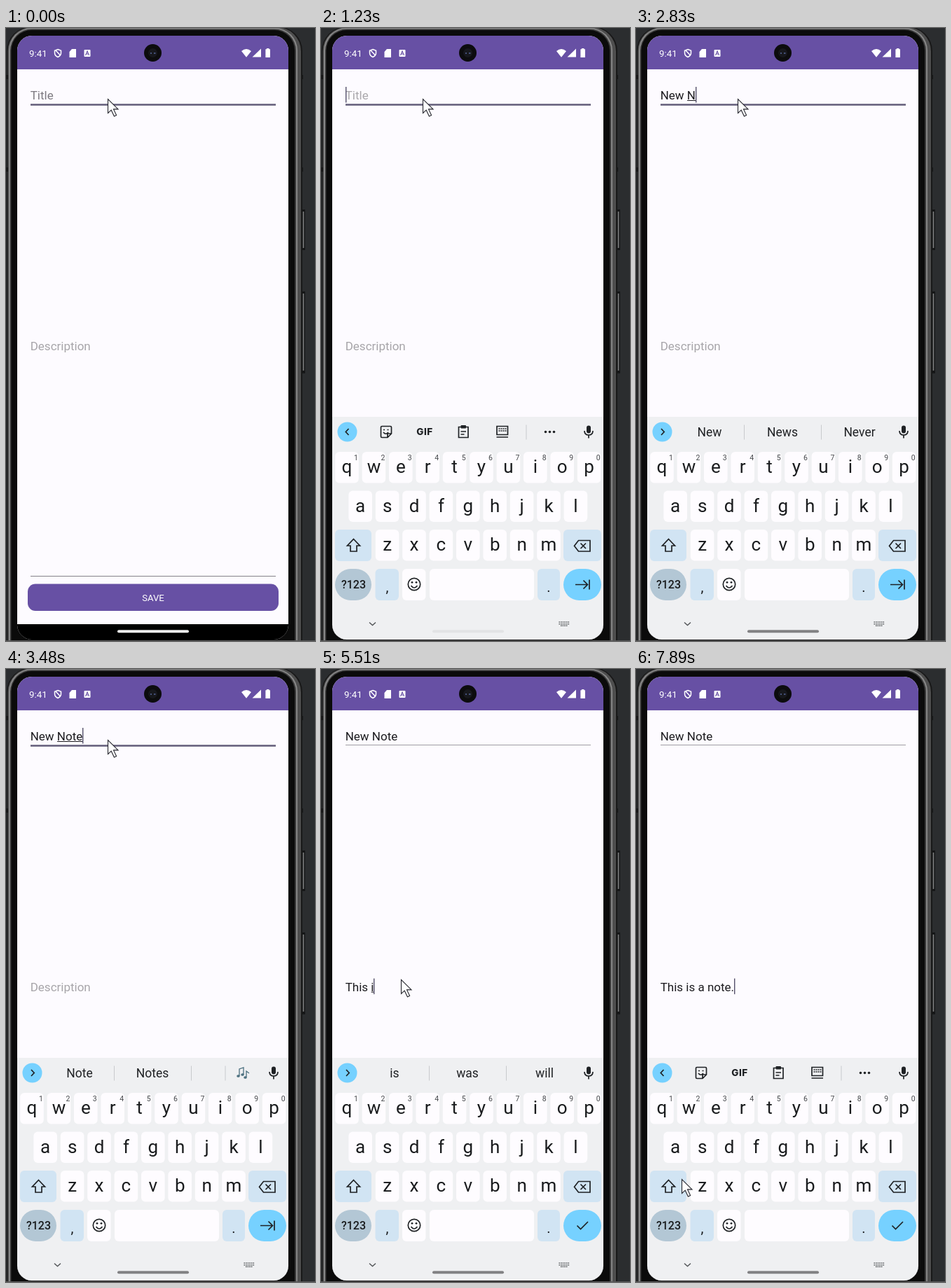
Animation, 441 px wide and 875 px high, one loop 8000 ms. Source, as an HTML page:

```html
<!DOCTYPE html>
<html lang="en">
<head>
<meta charset="utf-8">
<title>New note</title>
<style>
  html, body { margin: 0; width: 100%; height: 100%; overflow: hidden; background: #2b2d2f; }
  svg { display: block; width: 441px; height: 875px; }
  text { font-family: Roboto, sans-serif; white-space: pre; }
  .field { font-size: 17px; fill: #1c1b1f; }
  .key { font-size: 26px; fill: #1a1c1e; text-anchor: middle; }
  .hint { font-size: 10.5px; fill: #44474a; text-anchor: middle; }
  .word { font-size: 17.5px; fill: #1f2124; text-anchor: middle; }
  .line { fill: none; stroke: #1f2225; stroke-width: 1.7; }
</style>
</head>
<body>
<svg viewBox="0 0 441 875">
  <defs>
    <clipPath id="screen"><rect x="16" y="11" width="387" height="862" rx="21"/></clipPath>
  </defs>

  <rect width="441" height="875" fill="#2b2d2f"/>
  <g fill="#161718">
    <path d="M421 67h3v6h-3zM421 199h3v6h-3zM423 259h4v58h-4zM423 376h4v117h-4z"/>
    <path d="M424.500 262v52M424.500 379v110" stroke="#808182" stroke-width="1.600"/>
  </g>
  <rect x="1" y="-2" width="422" height="910" rx="35" fill="#181818"/>
  <rect x="2.500" y="-1" width="418.500" height="908" rx="34" fill="#4e4e4e"/>
  <rect x="4" y="0" width="412" height="906" rx="32" fill="#868686"/>
  <rect x="6" y="1.500" width="408" height="904" rx="31" fill="#3a3a3a"/>
  <rect x="7.500" y="3" width="404.500" height="902" rx="29" fill="#0b0b0b"/>
  <path d="M0 67h3v6H0zM0 199h3v6H0z" fill="#171717"/>
  <path d="M0 874.500H441" stroke="#555"/>

  <g clip-path="url(#screen)">
    <rect x="16" y="11" width="387" height="862" fill="#fdfbff"/>
    <rect x="16" y="11" width="387" height="48" fill="#6750a4"/>
    <rect x="31" y="793.500" width="358" height="38.500" rx="11" fill="#6750a4"/>
    <text x="210" y="818" fill="#fff" font-size="13.1" text-anchor="middle">SAVE</text>
    <path d="M35 782.500H385" stroke="#858289"/>
    <rect x="16" y="851" width="387" height="23" fill="#000"/>
    <g id="view"></g>
  </g>

  <g fill="#fff">
    <text x="33" y="41" font-size="13.3">9:41</text>
    <path d="M74 30.500l4.500 1.700v3.600q0 3.700-4.500 5.700-4.500-2-4.500-5.700v-3.600zM71 32l6.500 7" fill="none" stroke="#fff" stroke-width="1.500"/>
    <path d="M94 30h6v12H90.500V34z"/>
    <rect x="111.500" y="31" width="9" height="10" rx="1"/>
    <path d="M113.500 39l2.500-6 2.500 6M114.500 37h3" fill="none" stroke="#6750a4" stroke-width="1.100"/>
    <path d="M336 33q7-6 14 0l-7 8.700zM351.500 41.500L364 29.500v12zM372 29h3.400v1.300h1.600V42h-6.600V30.300H372z"/>
  </g>
  <circle cx="209.500" cy="35.500" r="12.500" fill="#0c0c0e"/>
  <circle cx="209.500" cy="35.500" r="6.500" fill="#17181d"/>
  <path d="M206 36h2M211 36h2.500" stroke="#45517a" stroke-width="2"/>
  <path id="mouse" d="M.5.5v20l4.700-4.300 4.200 8.800 3.200-1.500-4.100-8.600H15z" fill="#fff" stroke="#26262e" stroke-width="1.100"/>
</svg>

<script>
const LOOP = 8000;
const LEFT = 35;
const INK = '#1f2225', BLUE = '#76d1ff', SOFT = '#d1e4f3', WHITE = '#fefcff';

// Each step changes only the properties it names. `under` is where the underlined word starts.
const steps = [
  [0, { title: '', desc: '', field: 'title', caret: 0, hint: '#7d7a80', under: -1, kb: -1,
        caps: 0, strip: null, enter: 'next', pill: '#ededed', mouse: [145, 101] }],
  [150, { caret: 1, hint: '#aaa8ac' }],
  [570, { caret: 0 }],
  [1080, { caret: 1, kb: 34, pill: '#fff' }],
  [1230, { kb: 0, pill: '#e2e3e5' }],
  [1500, { caret: 0, pill: '#c6c7c9' }],
  [1770, { pill: '#a9aaac' }],
  [2010, { caps: 1, pill: '#929294' }],
  [2150, { caps: 0, caret: 1, title: 'N', under: 0 }],
  [2440, { title: 'Ne', pill: '#8a8a8c' }],
  [2560, { title: 'New' }],
  [2830, { title: 'New N', under: 4, strip: ['New', 'News', 'Never'], pill: '#828284' }],
  [2950, { title: 'New No', strip: ['N', 'Now', 'Not'] }],
  [3080, { title: 'New Not', strip: ['No', 'Not', 'Now'] }],
  [3210, { title: 'New Note', strip: ['Not', 'Note', 'Now'] }],
  [3360, { strip: ['Note', 'Notes', ''] }],
  [3480, { strip: ['Note', 'Notes', '', 'music'] }],
  [3600, { strip: ['Note', 'Notes', 'music', 'music'], mouse: [128, 270] }],
  [3720, { mouse: [114, 420] }],
  [3870, { mouse: [114, 443], caret: 0 }],
  [4180, { field: 'desc', caret: 1, under: -1 }],
  [4300, { strip: null, enter: 'done' }],
  [4730, { caret: 0 }],
  [4870, { caret: 1, desc: 'T', under: 0 }],
  [4990, { desc: 'Th', strip: ['T', 'The', 'This'] }],
  [5120, { desc: 'Thi', strip: ['Th', 'The', 'This'] }],
  [5240, { desc: 'This', strip: ['Thi', 'This', 'Thin'] }],
  [5390, { desc: 'This ', under: -1, strip: ['This', 'This is', 'Thus'] }],
  [5510, { desc: 'This i', under: 5, strip: ['is', 'was', 'will'] }],
  [5630, { desc: 'This is', strip: ['I', 'is', 'in'] }],
  [5780, { desc: 'This is ', under: -1, strip: ['is', 'it', 'isn’t'] }],
  [5900, { desc: 'This is a', under: 8, strip: ['a', 'the', 'an'] }],
  [6050, { desc: 'This is a n', under: 10, strip: ['a', 'and', 'an'] }],
  [6170, { desc: 'This is a no', strip: ['n', 'new', 'no'] }],
  [6320, { desc: 'This is a note', strip: ['not', 'note', 'phone', 'ban'] }],
  [6440, { desc: 'This is a note.', strip: ['note', 'notes', 'music', 'music'] }],
  [6690, { under: -1, strip: null }],
  [7120, { caret: 0 }],
  [7620, { caret: 1, mouse: [156, 528] }],
  [7740, { mouse: [172, 628] }],
  [7890, { mouse: [65, 728] }]
];

const states = [];
for (const [, change] of steps) states.push({ ...states.at(-1), ...change });

const pen = document.createElement('canvas').getContext('2d');
const widthOf = text => {
  pen.font = '17px Roboto, sans-serif';
  return pen.measureText(text).width;
};

const text = (cls, x, y, value, more = '') => `<text class="${cls}" x="${x}" y="${y}" ${more}>${value}</text>`;
const line = (d, more = '') => `<path class="line" d="${d}" ${more}/>`;
const box = (x, y, w, h, fill, r = 6) =>
  `<rect x="${x}" y="${y}" width="${w}" height="${h}" rx="${r}" fill="${fill}"/>`;
const dot = (x, y, r, fill = INK) => `<circle cx="${x}" cy="${y}" r="${r}" fill="${fill}"/>`;
const rule = x => `<path d="M${x} 566.500v21" stroke="#c8cacd"/>`;

const emoji = {
  music: x => `<g fill="#4d7180" stroke="#4d7180" stroke-width="1.300">
    <path fill="none" d="M${x - 5} 581v-10l6-2v10M${x + 5} 583v-9l4 3"/>
    ${[[-6.500, 581], [-.5, 579], [3.500, 583]].map(([dx, y]) => `<ellipse cx="${x + dx}" cy="${y}" rx="1.600" ry="1.200"/>`).join('')}</g>`,
  phone: x => dot(x, 576.5, 9, '#43383a') + box(x - 3, 570, 6, 13, '#262326', 1) +
    `<path d="M${x - 7} 573l14 7M${x - 7} 580l4-3M${x + 3} 572l4 2" stroke="#d93a34" stroke-width="2.500"/>`,
  ban: x => `<g fill="none" stroke="#e2443f" stroke-width="2.200"><circle cx="${x}" cy="576.500" r="8.200"/><path d="M${x - 6} 570.500l12 12"/></g>`
};

function input(s, name, baseline, hint, hintColor) {
  const value = s[name];
  let out = value ? text('field', LEFT - .3, baseline, value)
                  : text('field', LEFT - .3, baseline, hint, `style="fill:${hintColor}"`);
  if (s.field !== name) return out;
  const end = LEFT + widthOf(value);
  if (s.under >= 0) {
    const from = LEFT + widthOf(value.slice(0, s.under));
    out += `<path d="M${from} ${baseline + 1.5}H${end}" stroke="#1c1b1f"/>`;
  }
  if (s.caret) out += box(Math.floor(end), baseline - 18, 1.4, 22.5, '#55516b', 0);
  return out;
}

function toolbar() {
  return line('M39.500 572l-4.200 4.500 4.200 4.500') +
    line('M87 568.500H99q1.500 0 1.500 1.500v9l-5.500 5.500H87q-1.500 0-1.500-1.500V570q0-1.500 1.500-1.500zM100 579h-5v5M89 577q3.500 4.500 7 0M89 573.500h2M94.500 573.500h2') +
    `<text x="148" y="581.300" fill="${INK}" text-anchor="middle" style="font:800 13.500px Inter,sans-serif;letter-spacing:.5px">GIF</text>` +
    line('M196.500 569.500h13.500v15h-13.500zM199.500 576h7.500M199.500 580h5') + box(199.5, 567, 7.5, 4.5, INK, 1) +
    line('M251 568.500h15.500v12H251zM250.500 584h16.500') + line('M253.500 572h11M253.500 575h11', 'stroke-dasharray="2 1"') +
    rule(293) + [320.5, 326.5, 332.5].map(x => dot(x, 576.5, 1.8)).join('');
}

function suggestions(items) {
  const pictures = items.length > 3;
  const content = items.map((item, i) => {
    if (pictures && i > 1) return item ? emoji[item](i === 2 ? 289 : 338) : '';
    return text('word', [105, 209, 319][i], 583, item);
  }).join('');
  return line('M36 572l4.200 4.500-4.200 4.500') + rule(154.5) + rule(264.5) + (pictures ? rule(313) : '') + content;
}

function letters(row, x, top, s) {
  return [...row].map((letter, i) => {
    const cx = x + 38.4 * i;
    const digit = top < 610 ? text('hint', cx + 13, 617, (i + 1) % 10) : '';
    return box(cx - 16.8, top, 33.6, 44.5, WHITE) +
      text('key', cx, top + 30, s.caps ? letter.toUpperCase() : letter) + digit;
  }).join('');
}

function keyboard(s) {
  const enterIcon = s.enter === 'next' ? 'M363 794.500h17M374.500 788.500l6 6-6 6M383 787.500v14' : 'M365.500 794.500l5 5 10.500-10.500';
  return `<g transform="translate(0 ${s.kb})">` +
    box(16, 555, 387, 330, '#eff0f2', 0) + dot(37.5, 576.5, 14, BLUE) +
    (s.strip ? suggestions(s.strip) : toolbar()) +
    box(379, 567.5, 6, 11, INK, 3) + line('M376 575q0 6 6 6t6-6M382 581v4.500') +
    letters('qwertyuiop', 37, 605, s) + letters('asdfghjkl', 56.2, 660.5, s) + letters('zxcvbnm', 94.6, 716, s) +
    box(20, 716, 52, 45, SOFT) + box(346, 716, 54, 45, SOFT) +
    line('M46.500 729.500l9 9.500h-4.500v8h-9v-8h-4.500z', s.caps ? `style="fill:${INK}"` : '') +
    line('M367.500 731.500H384v15.500h-16.500l-6-7.750zM370.500 735.500l7.500 7.500M378 735.500l-7.500 7.500') +
    box(20, 772, 52, 45, '#b3c7d5', 22.5) + box(77.5, 772, 33.5, 45, SOFT) +
    box(116, 772, 33.5, 45, WHITE) + box(155, 772, 149, 45, WHITE) +
    box(309, 772, 32, 45, SOFT) + box(346, 772, 54, 45, BLUE, 22.5) +
    text('key', 46.5, 799.5, '?123', 'style="font-size:16px;font-weight:500"') +
    text('key', 94.5, 805, ',', 'style="font-size:20px"') + text('key', 325, 805, '.', 'style="font-size:20px"') +
    '<circle class="line" cx="133" cy="794" r="8.700"/>' + line('M128.500 796q4.500 6 9 0') +
    dot(130, 791.3, 1.4) + dot(136, 791.3, 1.4) + line(enterIcon) +
    line('M69 848.500l4.500 4 4.500-4', 'style="stroke:#55585b;stroke-width:1.500"') +
    line('M339.500 848h15M339.500 850.700h15M342 853.300h10', 'style="stroke:#55585b;stroke-width:1.400" stroke-dasharray="1.600 1"') +
    '</g>';
}

function draw(s) {
  const focused = s.field === 'title';
  document.getElementById('view').innerHTML =
    `<path d="M35 ${focused ? 109.5 : 108.5}H385" stroke="${focused ? '#625c78' : '#a09da3'}" stroke-width="${focused ? 2.3 : 1}"/>` +
    input(s, 'title', 102, 'Title', s.hint) +
    input(s, 'desc', 459.7, 'Description', '#a7a5a9') +
    (s.kb >= 0 ? keyboard(s) : '') +
    box(159, 859.3, 102, 4, s.pill, 2);
  document.getElementById('mouse').setAttribute('transform', `translate(${s.mouse})`);
}

const start = performance.now();
let shown = -1;
function tick() {
  const t = (performance.now() - start) % LOOP;
  const index = steps.findLastIndex(([at]) => at <= t);
  if (index !== shown) draw(states[shown = index]);
  requestAnimationFrame(tick);
}
tick();
</script>
</body>
</html>
```
